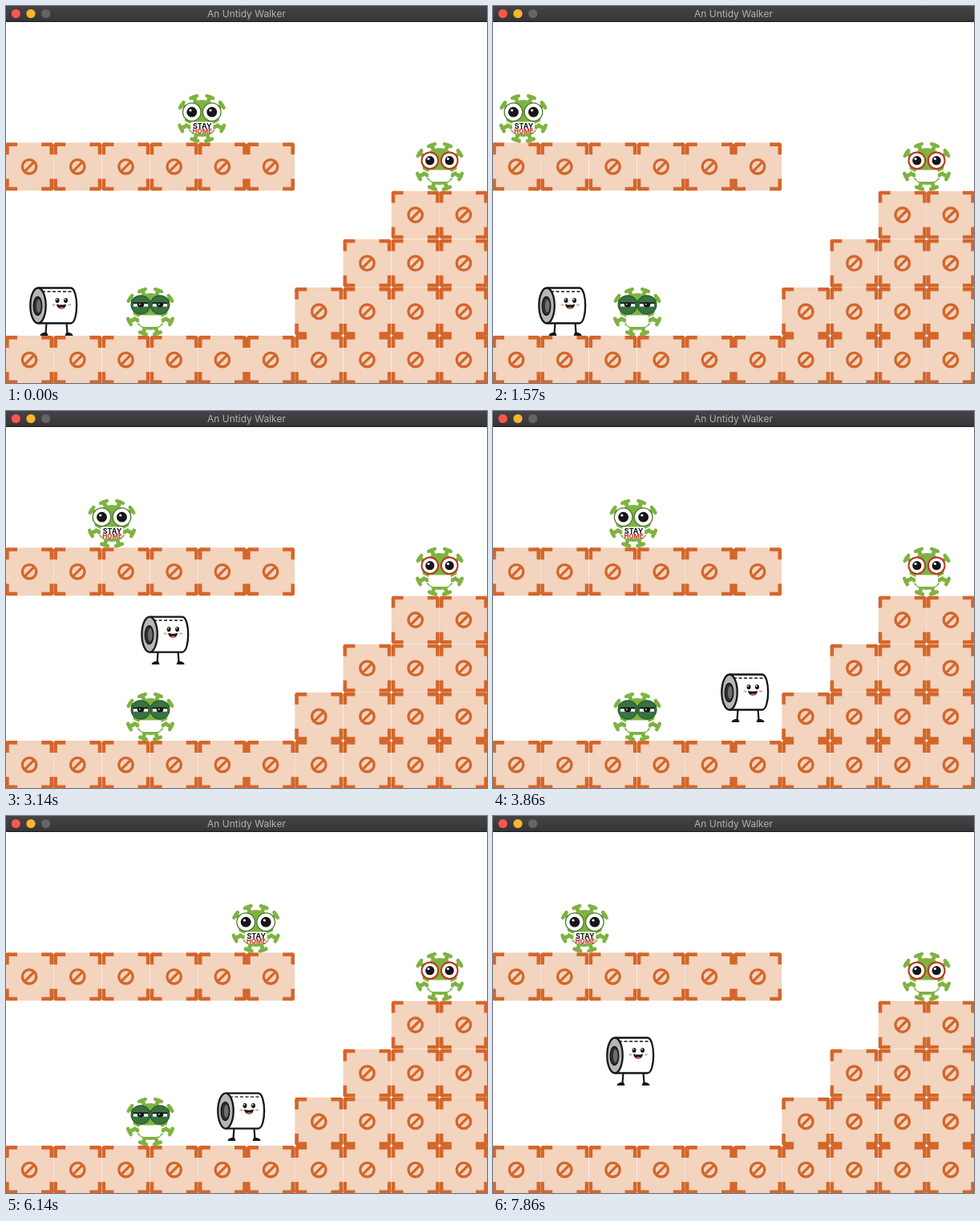
These frames come from a looping animation (600x470 px, 8000 ms). An HTML page with a canvas:

```html
<!DOCTYPE html>
<html lang="en">
<head>
<meta charset="utf-8">
<title>Platform game</title>
<style>
html, body { margin: 0; width: 100%; height: 100%; overflow: hidden; background: #fff; }
canvas { display: block; }
</style>
</head>
<body>
<canvas id="stage" width="600" height="470"></canvas>
<script>
const ctx = document.getElementById('stage').getContext('2d');
const LOOP = 8000, FPS = 7, TAU = Math.PI * 2;
const TILE = 60.2, FLOOR = 411;
const ORANGE = '#d4662a', SAND = '#f2d4bf', GREEN = '#7fb241', INK = '#161616';

function ellipse(x, y, rx, ry, fill, stroke, width = 1) {
  ctx.beginPath();
  ctx.ellipse(x, y, rx, ry, 0, 0, TAU);
  if (fill) { ctx.fillStyle = fill; ctx.fill(); }
  if (stroke) { ctx.strokeStyle = stroke; ctx.lineWidth = width; ctx.stroke(); }
}
const disc = (x, y, r, fill, stroke, width) => ellipse(x, y, r, r, fill, stroke, width);

function rect(x, y, w, h, fill) {
  ctx.fillStyle = fill;
  ctx.fillRect(x, y, w, h);
}

function line(points, color, width) {
  ctx.strokeStyle = color;
  ctx.lineWidth = width;
  ctx.beginPath();
  points.forEach(([x, y], i) => i ? ctx.lineTo(x, y) : ctx.moveTo(x, y));
  ctx.stroke();
}

function label(text, x, y, font, color) {
  ctx.font = font;
  ctx.fillStyle = color;
  ctx.textAlign = 'center';
  ctx.fillText(text, x, y);
}

function at(x, y, draw) {
  ctx.save();
  ctx.translate(x, y);
  draw();
  ctx.restore();
}

// ---- scenery ----
function titleBar() {
  const shade = ctx.createLinearGradient(0, 0, 0, 20);
  shade.addColorStop(0, '#444345');
  shade.addColorStop(1, '#353436');
  rect(0, 0, 600, 20, shade);
  rect(0, 19, 600, 1, '#1b1b1b');
  ['#fc5650', '#fdb52c', '#656466'].forEach((c, i) => disc(12.3 + i * 18.7, 9.5, 5.6, c));
  label('An Untidy Walker', 300, 14, '12px Inter, Roboto, sans-serif', '#b3b2b4');
}

function tile(col, row) {
  at(col * TILE - 1, 170.2 + row * TILE, () => {
    ctx.beginPath();
    ctx.roundRect(0, 0, TILE, TILE, 4);
    ctx.clip();
    rect(0, 0, TILE, TILE, SAND);
    for (const sx of [-1, 1]) for (const sy of [-1, 1]) {
      ctx.save();
      ctx.translate(TILE / 2, TILE / 2);
      ctx.scale(sx, sy);
      rect(15.1, 25.4, 15, 4.7, ORANGE);
      rect(25.4, 15.1, 4.7, 15, ORANGE);
      ctx.restore();
    }
    const c = TILE / 2;
    disc(c, c, 8.7, null, ORANGE, 3.4);
    line([[c - 6, c + 6], [c + 6, c - 6]], ORANGE, 3.2);
  });
}

const ROWS = [[0, 5], [8, 9], [7, 9], [6, 9], [0, 9]];
function scenery() {
  rect(0, 0, 600, 470, '#fff');
  ROWS.forEach(([from, to], row) => {
    for (let col = from; col <= to; col++) tile(col, row);
  });
}

// ---- viruses, origin at their centre ----
const SPIKES = [[10, -26.5], [25, -16.5], [26, 12.5], [9, 27]];
function spikes() {
  ctx.lineCap = 'round';
  for (const side of [-1, 1]) for (const [px, y] of SPIKES) {
    const x = px * side, len = Math.hypot(x, y);
    const nx = -y / len * 4, ny = x / len * 4;
    line([[x * 0.6, y * 0.6], [x, y]], GREEN, 5);
    line([[x - nx, y - ny], [x + nx, y + ny]], GREEN, 4.6);
  }
  ctx.lineCap = 'butt';
}

function body() {
  spikes();
  ellipse(0, 0, 21.5, 23, GREEN);
}

function mask() {
  line([[-22, 4], [-14, 8]], '#fff', 1.5);
  line([[22, 4], [14, 8]], '#fff', 1.5);
  line([[-21, 14], [-13, 14]], '#fff', 1.2);
  line([[21, 14], [13, 14]], '#fff', 1.2);
  ctx.fillStyle = '#fff';
  ctx.beginPath();
  ctx.roundRect(-14, 4.5, 28, 14.5, [2, 2, 6, 6]);
  ctx.fill();
}

function eye(x, y, r, rim, rimWidth, pupil) {
  disc(x, y, r, '#fff', rim, rimWidth);
  disc(x, y, pupil, INK);
  disc(x - 1.8, y - 2.2, 1.6, '#fff');
}

function walker() {
  body();
  mask();
  for (const x of [-12.5, 12.5]) eye(x, -7.8, 11.3, '#4f7b2c', 1.3, 6.4);
  label('STAY', 0.5, 13, 'bold 9px Inter, Roboto, sans-serif', INK);
  label('HOME', 0.5, 19, 'bold 8px Inter, Roboto, sans-serif', '#c42b20');
}

function reader() {
  body();
  mask();
  for (const x of [-12.2, 12.2]) eye(x, -7.3, 10.3, '#b8371d', 2, 5.6);
}

function sleeper() {
  body();
  mask();
  line([[-24, -13], [24, -13]], '#2f6a38', 2);
  for (const x of [-12, 12]) {
    ellipse(x, -8.5, 11.8, 11.5, '#397341', '#2a5d33', 1.4);
    rect(x - 9, -10.5, 18, 4.2, '#fff');
    rect(x - 9.5, -11.5, 19, 1.8, INK);
    ellipse(x, -8.5, 4.2, 3, INK);
    rect(x - 2, -9.8, 1.6, 1.4, '#fff');
  }
}

// ---- paper roll, origin at the middle of its soles ----
function leg(side) {
  const x = side * 13.5 + 4;
  line([[x - side, -16], [x, -3]], INK, 2.2);
  ctx.fillStyle = INK;
  ctx.beginPath();
  ctx.moveTo(x - side * 3, 0);
  ctx.lineTo(x - side * 1.5, -4);
  ctx.lineTo(x + side * 2, -4);
  ctx.quadraticCurveTo(x + side * 7, -3, x + side * 7, 0);
  ctx.fill();
}

function roll() {
  leg(-1);
  leg(1);
  ctx.beginPath();
  ctx.moveTo(-19, -59.5);
  ctx.lineTo(22, -59.5);
  ctx.bezierCurveTo(31.5, -58, 31.5, -17, 22, -15.5);
  ctx.lineTo(-19, -15.5);
  ctx.fillStyle = '#fff';
  ctx.fill();
  ctx.strokeStyle = INK;
  ctx.lineWidth = 2.3;
  ctx.stroke();
  ctx.setLineDash([4, 2.5]);
  line([[-14, -55], [26, -55]], INK, 1.4);
  ctx.setLineDash([]);
  ellipse(-19, -37.5, 9.7, 22, '#b6b6b6', INK, 2.3);
  ellipse(-19.5, -37, 5.3, 11.5, '#303030', INK, 1.3);
  ellipse(-18.3, -37, 2.8, 8, '#6e6e6e');
  for (const x of [5, 15.5]) {
    ellipse(x, -44, 2.5, 3.1, INK);
    disc(x - 0.7, -45.2, 0.9, '#fff');
  }
  for (const x of [0.5, 20]) ellipse(x, -38.5, 2.2, 1.3, '#f3a79b');
  ctx.beginPath();
  ctx.moveTo(4, -39.3);
  ctx.quadraticCurveTo(10, -37.5, 16, -39.3);
  ctx.bezierCurveTo(15.5, -31.5, 5, -31.5, 4, -39.3);
  ctx.fillStyle = INK;
  ctx.fill();
  ellipse(10.3, -34.6, 2.9, 1.2, '#dd5b50');
}

// ---- motion ----
const PATH = [[0, 59], [860, 93], [2290, 79], [2400, 79], [3860, 314],
  [4860, 276], [6140, 293], [7000, 293], [7860, 171], [8000, 151]];
const JUMPS = [1716, 2650, 3811, 6128, 7087];
const STOMP = 7740;

function along(keys, t) {
  const i = Math.max(1, keys.findIndex(k => k[0] >= t));
  const [t0, a] = keys[i - 1], [t1, b] = keys[i];
  return a + (b - a) * (t - t0) / (t1 - t0);
}

function arc(t, start, span, height) {
  const u = (t - start) / span;
  return u > 0 && u < 1 ? 4 * height * u * (1 - u) : 0;
}

function rollLift(t) {
  if (t >= STOMP) {
    const s = (t - STOMP) / 1000;
    return 60 + 200 * s - 625 * s * s;
  }
  return Math.max(...JUMPS.map(j => arc(t, j, 800, 100)));
}

const walkerX = t => 30 + 0.0599 * ((t - 1437 + 5015) % 5015);

function render(now) {
  const step = Math.floor((now % LOOP + 5) * FPS / 1000) % (LOOP * FPS / 1000);
  const t = Math.round(step * 100 / FPS) * 10;
  scenery();
  titleBar();
  at(walkerX(t), 140, walker);
  at(541, 200, reader);
  if (t < STOMP) at(180, 381 - arc(t, 600, 500, 21.5), sleeper);
  at(along(PATH, t), FLOOR - rollLift(t), roll);
}

let begin;
function frame(now) {
  begin ??= now;
  render(now - begin);
  requestAnimationFrame(frame);
}
render(0);
requestAnimationFrame(frame);
</script>
</body>
</html>
```
